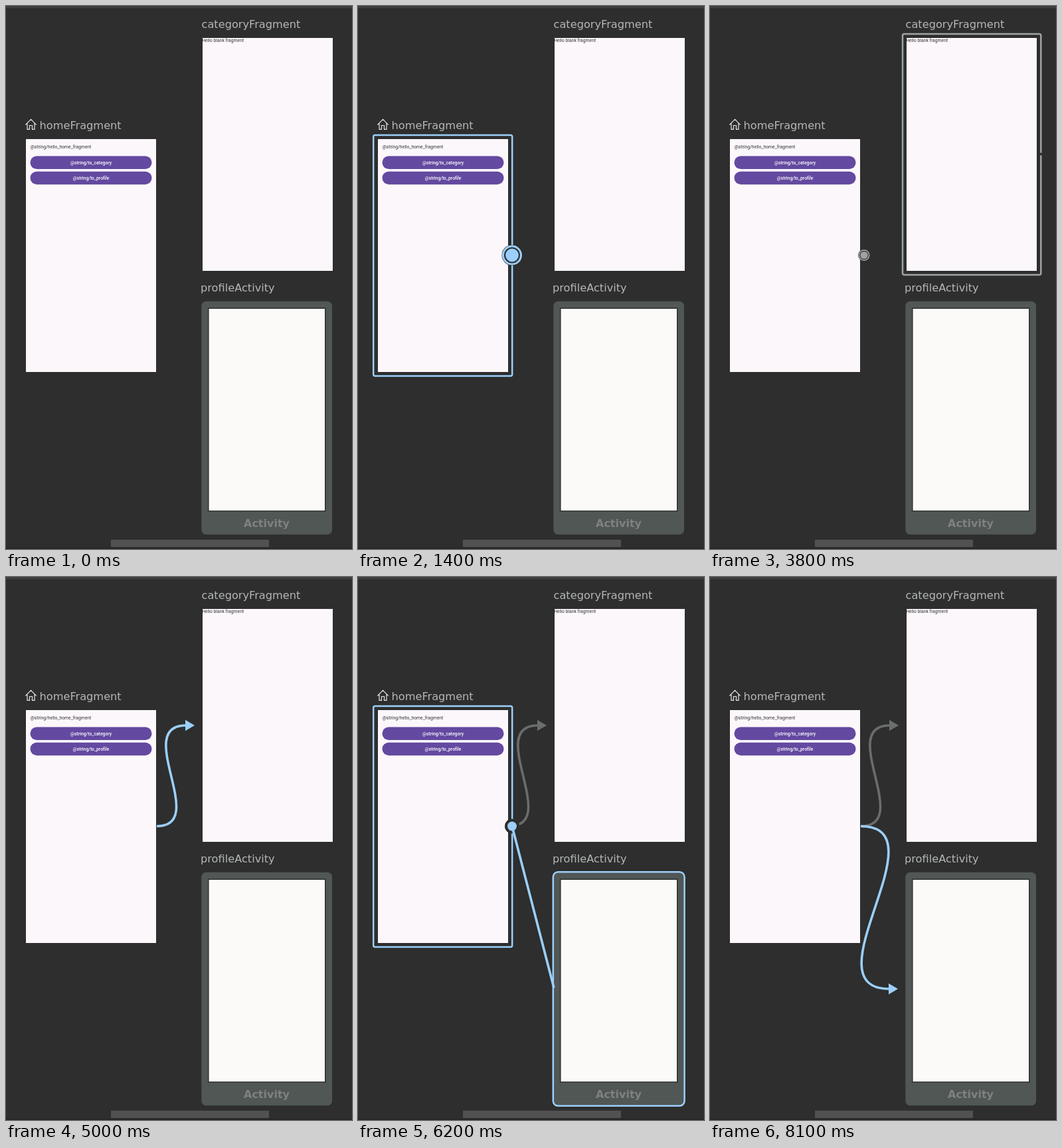
Write an HTML page that moves like this. It is 521x816 px and loops after 9.4 s.

```html
<!DOCTYPE html>
<html lang="en">
<head>
<meta charset="utf-8">
<title>Navigation editor</title>
<style>
  html, body { margin: 0; width: 100%; height: 100%; overflow: hidden; background: #2d2e2d; }
  svg { display: block; width: 521px; height: 816px; }
  .title { font: 16.2px "DejaVu Sans", sans-serif; fill: #b4b7b6; }
  .activity { font: bold 16px "DejaVu Sans", sans-serif; fill: #7e8281; text-anchor: middle; }
  .small { font: 6.8px Roboto, sans-serif; fill: #333; }
  .label { font: 500 6.8px Roboto, sans-serif; fill: #fff; text-anchor: middle; }
  .screen { fill: #fcf7fb; }
  .button { fill: #6349a0; }
  .outline, .curve, .icon { fill: none; }
  .outline { stroke-width: 2.5; }
  .curve { stroke-width: 3.6; }
  .icon { stroke: #e4e6e5; stroke-width: 1.2; }
</style>
</head>
<body>
<svg viewBox="0 0 521 816">
  <rect width="521" height="816" fill="#2d2e2d"/>
  <rect width="521" height="3.5" fill="#3d403e"/>
  <rect y="814.5" width="521" height="1.5" fill="#272328"/>
  <rect x="158" y="802" width="238" height="11" fill="#505150"/>

  <path class="icon" d="M29.3 178.7L37.5 170.4L45.7 178.7M32 176.5V185.3H35.5V179.5H39.5V185.3H43V176.5"/>
  <text class="title" x="50.5" y="185">homeFragment</text>
  <rect class="screen" x="30" y="200" width="196" height="350"/>
  <text class="small" x="36.7" y="214">@string/hello_home_fragment</text>
  <rect class="button" x="36.5" y="225.5" width="183" height="19.5" rx="9.75"/>
  <rect class="button" x="36.5" y="248.7" width="183" height="19.5" rx="9.75"/>
  <text class="label" x="128" y="238">@string/to_category</text>
  <text class="label" x="128" y="261">@string/to_profile</text>

  <text class="title" x="294.5" y="33">categoryFragment</text>
  <rect class="screen" x="296" y="48" width="196" height="350"/>
  <text class="small" x="295.2" y="54">Hello blank fragment</text>

  <text class="title" x="293" y="429">profileActivity</text>
  <rect x="294.3" y="443.7" width="196.7" height="350.6" rx="7" fill="#505755"/>
  <rect x="304.8" y="454.3" width="176" height="304.7" fill="#fcf9f9" stroke="#2b302e" stroke-width="1.5"/>
  <text class="activity" x="392.5" y="783">Activity</text>

  <g id="toCategory">
    <path class="curve" d="M227 374.5C307 374.5 190 223 271 223"/>
    <path stroke="none" d="M270 214.8L284 223L270 231.2Z"/>
  </g>
  <g id="toProfile">
    <path class="curve" d="M227 374.5C352 374.5 145 619 270 619"/>
    <path stroke="none" d="M269 610.8L283 619L269 627.2Z"/>
  </g>

  <rect id="home" class="outline" x="23.2" y="194" width="209" height="362" rx="2.5"/>
  <rect id="category" class="outline" x="290" y="42" width="208.3" height="362" rx="2.5"/>
  <rect id="profile" class="outline" x="293.8" y="443.2" width="197.8" height="351.6" rx="7.5"/>
  <g id="homeHandle"></g>
  <g id="categoryHandle"></g>
  <path id="drag" fill="none" stroke-width="3.6"/>
</svg>
<script>
const LOOP = 9400, STEP = 100;
const BLUE = '#9ccffb', GREY = '#9fa4a3', DIM = '#6b6d6c';
const $ = id => document.getElementById(id);

// Each track lists [start time, value]; a value holds until the next one.
const tracks = {
  home: [[0, ''], [100, GREY], [1000, BLUE], [3800, ''], [5100, GREY], [5600, BLUE], [6900, '']],
  category: [[0, ''], [3000, BLUE], [3800, GREY], [4300, ''], [8000, GREY], [8100, '']],
  profile: [[0, ''], [6100, BLUE], [6900, GREY], [8000, '']],
  toCategory: [[0, ''], [3900, BLUE], [5600, DIM]],
  toProfile: [[0, ''], [7000, BLUE]]
};
const homeRadius = [[0, 0], [100, 1.5], [400, 4], [500, 6.5], [600, 8.5], [1400, 15], [2000, 10.5],
  [3800, 8.5], [3900, 5], [4000, 0], [5100, 1.5], [5400, 8.5], [5500, 15], [5600, 10.5],
  [6900, 8.5], [7000, 5], [7100, 0]];
const categoryRadius = [[0, 0], [3800, 1.5], [3900, 4], [4000, 6.5], [4100, 8.5], [4300, 0],
  [8000, 1.5], [8100, 0]];

// Pointer positions while a connection is dragged: [time, x, y].
const drags = [
  { end: 3800, path: [[1900, 232, 374.5], [2900, 284, 205], [3400, 306, 198]] },
  { end: 6900, path: [[5500, 232, 374.5], [6200, 295, 617.5], [6600, 301, 619]] }
];

const at = (track, t) => track.findLast(([start]) => start <= t)[1];

function paint(id, color) {
  const el = $(id);
  el.setAttribute('visibility', color ? 'visible' : 'hidden');
  el.setAttribute('stroke', color);
  el.setAttribute('fill', color);
}

function drawHandle(id, x, y, r, color, dragging) {
  const ring = dragging ? '' :
    `<circle r="${r * 0.9}" fill="none" stroke="${color}" stroke-width="${r * 0.2}"/>`;
  const dot = r > 2 ? `${ring}<circle r="${r * 0.66}" fill="${color}"/>` : '';
  $(id).setAttribute('transform', `translate(${x} ${y})`);
  $(id).innerHTML = r ? `<circle r="${r + 0.5}" fill="#2d2e2d"/>${dot}` : '';
}

function pointer(path, t) {
  const next = path.findIndex(([time]) => time > t);
  if (next < 0) return path.at(-1).slice(1);
  const [t0, x0, y0] = path[next - 1], [t1, x1, y1] = path[next];
  const k = (t - t0) / (t1 - t0), e = k * k * (3 - 2 * k);
  return [x0 + (x1 - x0) * e, y0 + (y1 - y0) * e];
}

function draw(now) {
  const t = Math.floor(now % LOOP / STEP) * STEP;
  for (const id in tracks) paint(id, at(tracks[id], t));

  const drag = drags.find(d => t > d.path[0][0] && t < d.end);
  drawHandle('homeHandle', 232, 374.5, at(homeRadius, t), at(tracks.home, t) || GREY, drag);
  drawHandle('categoryHandle', 498.3, 222.5, at(categoryRadius, t), GREY);

  $('drag').setAttribute('stroke', drag ? BLUE : 'none');
  if (drag) $('drag').setAttribute('d', `M232 374.5L${pointer(drag.path, t)}`);
}

const began = performance.now();
function tick() {
  draw(performance.now() - began);
  requestAnimationFrame(tick);
}
for (const id of ['home', 'category', 'profile']) $(id).style.fill = 'none';
document.querySelectorAll('.curve').forEach(el => el.style.fill = 'none');
tick();
</script>
</body>
</html>
```
